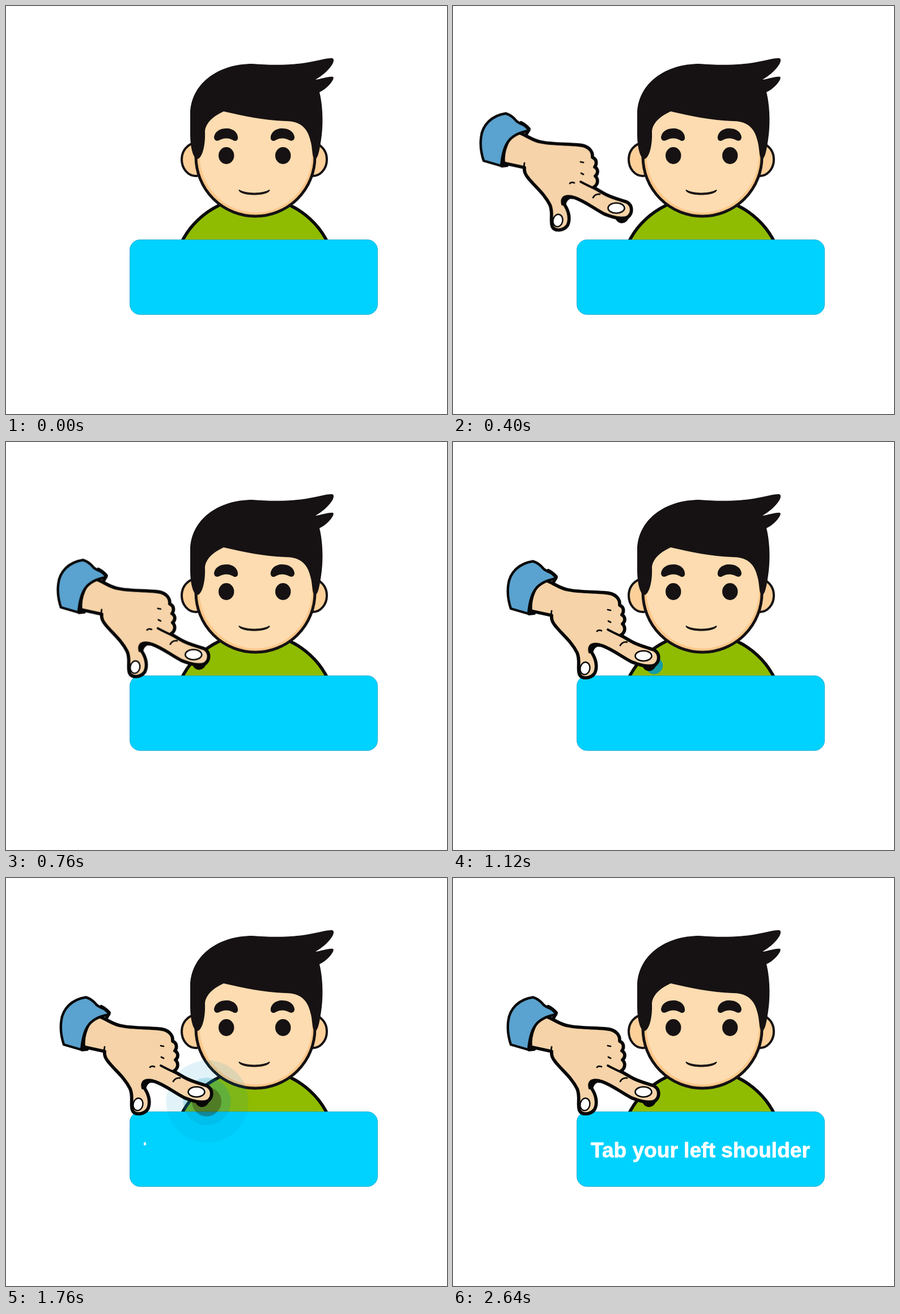
An HTML page for the animation above (4800 ms loop, 778 px wide and 720 px high).

```html
<!DOCTYPE html>
<html lang="en">
<head>
<meta charset="utf-8">
<title>Left shoulder</title>
<style>
  html, body { margin: 0; width: 100%; height: 100%; overflow: hidden; background: #fff; }
  svg { position: absolute; left: 0; top: 0; display: block; }

  .hand, .ring, .label { animation: 4.8s linear infinite; }

  .hand { animation-name: reach, appear; }
  @keyframes reach {
    0% { transform: translate(-62px, -27px); animation-timing-function: cubic-bezier(.65, 0, .35, 1); }
    21.667%, 100% { transform: none; }
  }
  @keyframes appear {
    0%, .7% { opacity: 0; }
    2.5%, 100% { opacity: 1; }
  }

  .ring { transform-box: fill-box; transform-origin: center; fill: #0096c3; }
  .outer { animation-name: outer; }
  .middle { animation-name: middle; }
  .inner { animation-name: inner; fill: #302400; }
  @keyframes outer {
    0%, 21.667% { transform: scale(0); opacity: .88; }
    23.333% { transform: scale(.15); opacity: .85; }
    30% { transform: scale(.6); opacity: .65; animation-timing-function: ease-out; }
    36.667% { transform: scale(.725); opacity: .12; }
    39%, 100% { transform: scale(.79); opacity: 0; }
  }
  @keyframes middle {
    0%, 25.8% { transform: scale(0); opacity: .2; }
    30% { transform: scale(.24); opacity: .2; }
    36.667% { transform: scale(.42); opacity: .22; }
    40%, 100% { transform: scale(.5); opacity: 0; }
  }
  @keyframes inner {
    0%, 31% { transform: scale(0); opacity: .2; }
    36.667% { transform: scale(.26); opacity: .36; }
    41%, 100% { transform: scale(.34); opacity: 0; }
  }

  .label {
    position: absolute; left: 240px; top: 455px; width: 400px; height: 50px;
    padding-left: 3px; box-sizing: border-box; white-space: nowrap;
    font: bold 37.1px/50px "Liberation Sans", Arial, sans-serif;
    color: #fff; -webkit-text-stroke: .8px #fff;
    animation-name: wipe;
  }
  @keyframes wipe {
    0%, 36% { clip-path: inset(0 400px 0 0); }
    36.667% { clip-path: inset(0 394px 0 0); }
    46.667% { clip-path: inset(0 199px 0 0); }
    55%, 100% { clip-path: inset(0 0 0 0); }
  }
</style>
</head>
<body>
<svg width="778" height="720" viewBox="0 0 778 720">
  <defs>
    <path id="brow" d="M367 231C369 220 379 216 389 216C401 216 410 224 409 234C408 239 403 239 399 236C391 232 383 233 376 237C371 239 367 237 367 231Z"/>
  </defs>

  <!-- body -->
  <path d="M304 430A144 144 0 0 1 573 430Z" fill="#8fbc00" stroke="#0b0b0b" stroke-width="5.6"/>

  <!-- head -->
  <g stroke="#161213" stroke-width="4">
    <ellipse cx="335" cy="271" rx="25" ry="29" fill="#fdd09a"/>
    <ellipse cx="541" cy="271" rx="25" ry="29" fill="#fdd09a"/>
    <circle cx="440" cy="266" r="105" fill="#fdc688" stroke-width="5"/>
  </g>
  <ellipse cx="440.5" cy="261.500" rx="99.500" ry="103" fill="#fcdcb0"/>
  <g fill="#161213">
    <path d="M337 270C329 268 325 246 325 226V190C326 137 374 102 435 102
      C470 105 505 104 530 100C548 97 564 92 575 92C580 93 578 99 575 104
      C568 115 556 124 546 130C557 129 567 124 577 125C581 129 566 147 553 152
      C559 176 560 208 556 235C553 256 550 270 545 270C540 269 541 254 538 241
      C532 213 518 203 492 203C456 202 420 194 384 186C362 196 351 209 351 223
      C352 249 345 270 337 270Z"/>
    <use href="#brow"/>
    <use href="#brow" transform="matrix(-1 0 0 1 876 0)"/>
    <ellipse cx="388.7" cy="264" rx="13.7" ry="15"/>
    <ellipse cx="488.7" cy="264" rx="13.7" ry="15"/>
    <path d="M411 324.500C424 332 452 332 465 324.500C466 328 456 333 438 333C420 333 410 328 411 324.500Z"
      stroke="#161213"/>
  </g>

  <rect x="218.5" y="412.5" width="437" height="132" rx="18" fill="#00d2ff" stroke="#1aa3c8" stroke-width=".8"/>

  <!-- touch ripple -->
  <circle class="ring outer" cx="355" cy="394.5" r="100"/>
  <circle class="ring middle" cx="354.5" cy="394.5" r="100"/>
  <circle class="ring inner" cx="354" cy="394.5" r="100"/>

  <!-- pointing hand -->
  <g class="hand" stroke="#080808" stroke-linecap="round" stroke-linejoin="round">
    <path d="M160 243C178 248 186 258 204 261C224 265 248 264 269 266C286 267 295 276 294 288
      C302 291 302 300 298 305C305 309 304 317 299 321C305 327 304 336 296 341
      L313 351C328 360 345 363 355 367C365 373 365 386 357 393C345 399 328 393 315 388
      C296 378 280 365 262 359C248 356 241 363 245 372C253 384 255 398 250 408
      C243 418 227 419 223 410C219 399 225 386 219 372C209 352 194 341 181 325
      C175 318 173 312 174 306L137 298C135 275 145 252 160 243Z"
      fill="#f6d3a8" stroke-width="5.8"/>
    <path d="M141 210.500C116 214 100 231 97.500 252C95 270 99 285 102 294L133 303
      C136 270 143 247 182 241C184 232 168 231 160 224Q151 213 141 210.500Z"
      fill="#5aa2cf" stroke-width="4.4"/>
    <path d="M168 227Q176 231 182 238L178 246M134 303L143 302" fill="none" stroke-width="6"/>
    <path d="M241 371C238 359 245 354 258 357Q247 361 245 371Z" fill="#080808" stroke-width="4"/>
    <path d="M337 397Q348 400 357 393Q353 402 347 402Q341 403 337 397Z" fill="#080808" stroke-width="4"/>
    <path d="M340 369Q350 368 353 375Q350 384 341 386Z" fill="#fff" stroke="none"/>
    <ellipse cx="336" cy="377.500" rx="14.5" ry="9" fill="#fff" stroke-width="2.6"/>
    <ellipse cx="233" cy="399.500" rx="8.500" ry="11" transform="rotate(12 233 399)" fill="#fff" stroke-width="2.4"/>
    <g fill="none" stroke-width="2.8">
      <path d="M273 331Q286 338 304 346" stroke-width="3.8"/>
      <path d="M254 334Q257 331 262 333M273 296L278 297M274 316L278 318M295 359Q299 352 307 353"/>
      <path d="M174 298Q172 307 175 315"/>
    </g>
  </g>
</svg>
<div class="label">Tab your left shoulder</div>
</body>
</html>
```
